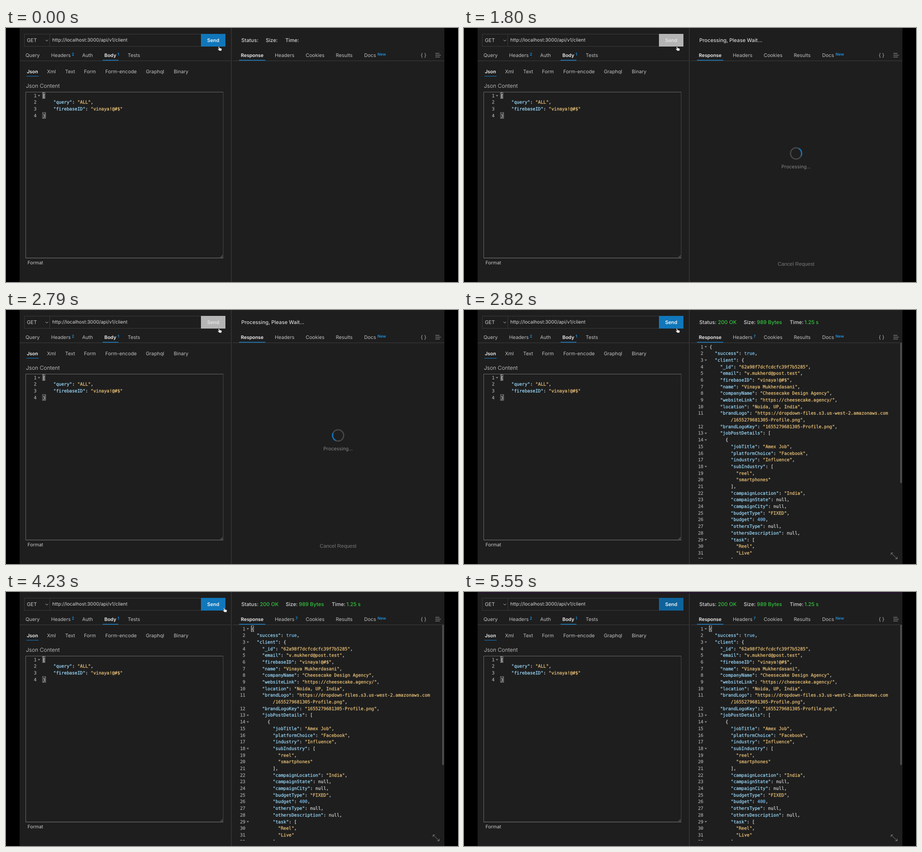
Animation, 997 px wide and 561 px high, one loop 6.03 s. Source, as an HTML page with a canvas:

```html
<!DOCTYPE html>
<html lang="en">
<head>
<meta charset="utf-8">
<title>API client request</title>
<style>
html, body { margin: 0; width: 100%; height: 100%; overflow: hidden; background: #000; }
canvas { display: block; width: 997px; height: 561px; }
</style>
</head>
<body>
<canvas id="stage" width="997" height="561"></canvas>
<script>
const ctx = document.getElementById('stage').getContext('2d');
const LOOP = 6030, SEND = 1560, DONE = 2820, FOCUS = 2880, MOVE = 4200;
const UI = 'Inter, sans-serif', MONO = '"DejaVu Sans Mono", monospace';
const CHAR = 5.88, LINE = 14.69;
const BUTTON = '#0e639c', HOVER = '#1177bb', LINK = '#1d93e4', GREEN = '#35c43f';
const TEXT = '#c0c0c0', BRIGHT = '#f2f2f2';

const requestBody = `{
    "query": "ALL",
    "firebaseID": "vinaya!@#$"
}`.split('\n');

const responseBody = `{
  "success": true,
  "client": {
    "_id": "62a98f7dcfcdcfc39f7b5285",
    "email": "v.mukherd@post.test",
    "firebaseID": "vinaya!@#$",
    "name": "Vinaya Mukherdasani",
    "companyName": "Cheesecake Design Agency",
    "websiteLink": "https://cheesecake.agency/",
    "location": "Noida, UP, India",
    "brandLogo": "https://dropdown-files.s3.us-west-2.amazonaws.com
        /1655279681305-Profile.png",
    "brandLogoKey": "1655279681305-Profile.png",
    "jobPostDetails": [
      {
        "jobTitle": "Amex Job",
        "platformChoice": "Facebook",
        "industry": "Influence",
        "subIndustry": [
          "reel",
          "smartphones"
        ],
        "campaignLocation": "India",
        "campaignState": null,
        "campaignCity": null,
        "budgetType": "FIXED",
        "budget": 400,
        "othersType": null,
        "othersDescription": null,
        "task": [
          "Reel",
          "Live"
        ],`.split('\n');

function rect(x, y, w, h, color) {
  ctx.fillStyle = color;
  ctx.fillRect(x, y, w, h);
}

function frame(x, y, w, h, color) {
  ctx.strokeStyle = color;
  ctx.lineWidth = 1;
  ctx.strokeRect(x, y, w, h);
}

function path(d, color, width = 1, fill) {
  const p = new Path2D(d);
  if (fill) { ctx.fillStyle = fill; ctx.fill(p); }
  ctx.strokeStyle = color;
  ctx.lineWidth = width;
  ctx.stroke(p);
}

function text(str, x, y, { size = 10.8, weight = 400, color = TEXT, font = UI, align = 'left' } = {}) {
  ctx.font = `${weight} ${size}px ${font}`;
  ctx.textAlign = align;
  ctx.fillStyle = color;
  ctx.fillText(str, x, y);
}

// Monospace text gets a hairline outline to look slightly heavier.
function mono(str, x, y, color, align = 'left') {
  text(str, x, y, { size: 9.77, font: MONO, color, align });
  ctx.strokeStyle = color;
  ctx.lineWidth = 0.25;
  ctx.strokeText(str, x, y);
}

function tabs(items, y, active) {
  for (const [label, x] of items) {
    const on = label === active;
    text(label, x, y, on ? { size: 10.5, weight: 600, color: BRIGHT } : {});
  }
}

const badge = (str, x, y) => text(str, x, y, { size: 8.6, weight: 600, color: LINK });

function tokenColor(token, isKey) {
  if (isKey) return '#9cdcfe';
  if (/["\/]/.test(token)) return '#efc57a';
  return /^(true|\d+)$/.test(token) ? '#74bdf2' : '#d8d8d8';
}

function code(lines, x, y, gutter) {
  let number = 0;
  lines.forEach((line, row) => {
    const base = y + row * LINE;
    const continued = line.trim()[0] === '/';
    if (!continued) mono(++number, gutter, base, '#a8a8a8', 'right');
    if (/[{[]$/.test(line)) {
      path(`M${gutter + 2.8} ${base - 4.4}h5l-2.5 3z`, '#8a8a8a', 0.2, '#8a8a8a');
    }
    for (const m of line.matchAll(/"[^"]*"(?=:)|"[^"]*"?|\/[^"]*"|true|\d+|[^"\s\d]+/g)) {
      const isKey = line[m.index + m[0].length] === ':';
      mono(m[0], x + m.index * CHAR, base, tokenColor(m[0], isKey));
    }
  });
}

function bracketBox(x, base, caretX, caretColor = '#c8c8c8') {
  frame(x, base - 10, 5.5, 13, '#858585');
  rect(caretX, base - 10.5, 1, 14, caretColor);
}

function requestPane(processing, hovered) {
  frame(40.5, 13.5, 443, 27, '#3a3a3a');
  rect(96, 14, 1, 26, '#3a3a3a');
  text('GET', 46, 31, { size: 11.1, color: '#cccccc' });
  path('M87 26l3 3l3 -3', '#bbb', 1);
  text('http://localhost:3000/api/v1/client', 102, 30, { size: 10.4, color: '#d8d8d8' });
  rect(430, 13, 54, 28, processing ? '#b5b5b5' : hovered ? HOVER : BUTTON);
  text('Send', 457, 30.5, { weight: 600, color: processing ? '#e2e2e2' : '#f4f4f4', align: 'center' });

  tabs([['Query', 43], ['Headers', 99.5], ['Auth', 168], ['Body', 217], ['Tests', 268.5]], 64, 'Body');
  badge('2', 145, 61);
  badge('1', 246, 61);
  rect(30, 72, 467, 1, '#3d3d3d');
  rect(213, 70.5, 35, 1.5, '#1480cc');

  tabs([['Json', 46], ['Xml', 90.5], ['Text', 130.5], ['Form', 172], ['Form-encode', 219],
        ['Graphql', 308.5], ['Binary', 370]], 100, 'Json');
  rect(45, 106, 27, 1, '#1480cc');
  text('Json Content', 44, 131.5, { size: 12, weight: 300, color: '#dddddd' });

  frame(43.5, 141.5, 435.5, 366.5, '#4a4a4a');
  path('M479 141.5H43.5V508H479', '#6c6c6c');
  path('M473 507l5 -5M476 507l2 -2', '#999', 0.8);
  code(requestBody, 81, 152.6, 67.5);
  bracketBox(80.5, 152.6, 82);
  bracketBox(80.5, 152.6 + 3 * LINE, 87, '#858585');
  text('Format', 47.5, 522.3, { size: 10.4, color: '#cccccc' });
}

function statusBar(processing, done) {
  const label = { size: 11.25, weight: 500, color: '#d6d6d6' };
  if (processing) return text('Processing, Please Wait...', 519, 31, label);
  const parts = done
    ? [['Status:', 519, '200 OK', 560], ['Size:', 617, '989 Bytes', 646], ['Time:', 718.5, '1.25 s', 751]]
    : [['Status:', 519], ['Size:', 573], ['Time:', 616]];
  for (const [name, x, value, vx] of parts) {
    text(name, x, 31, label);
    if (value) text(value, vx, 31, { ...label, size: 11.4, color: GREEN });
  }
}

function spinner(t) {
  const arc = (from, to, color) => {
    ctx.beginPath();
    ctx.arc(732.5, 277, 12.3, from, to);
    ctx.strokeStyle = color;
    ctx.lineWidth = 2.8;
    ctx.stroke();
  };
  const angle = Math.PI / 2 + (t - 2400) / 2000 * Math.PI * 2;
  arc(0, Math.PI * 2, '#464646');
  arc(angle - Math.PI / 4, angle + Math.PI / 4, '#1272b4');
  text('Processing...', 732.5, 310, { size: 10.6, color: '#868686', align: 'center' });
  text('Cancel Request', 732.5, 525, {
    size: 11.4, color: '#777777', font: '"Liberation Sans", sans-serif', align: 'center'
  });
}

function response(t) {
  ctx.save();
  ctx.beginPath();
  ctx.rect(500, 73, 467, 476);
  ctx.clip();
  code(responseBody, 541.5, 84.5, 528);
  if (t >= FOCUS) bracketBox(541, 84.5, 541);
  ctx.restore();
  rect(962, 73, 4, 309, '#4b4b4b');
  path('M942 536.5L955.5 549.5M942 541V536.5H946.5M955.5 545V549.5H951', '#929292', 0.9);
}

function responsePane(t, processing, done) {
  statusBar(processing, done);
  tabs([['Response', 518], ['Headers', 593], ['Cookies', 661], ['Results', 727.5], ['Docs', 790]], 64, 'Response');
  badge('New', 819.5, 61);
  if (done) badge('7', 638.5, 61);
  text('{ }', 921, 64, { size: 11, color: '#bcbcbc', align: 'center' });
  path('M947 56h9M947 60h12M947 64h10', '#a8a8a8');
  rect(500, 72, 467, 1, '#3d3d3d');
  rect(514, 70.5, 58, 1.5, '#1480cc');
  if (processing) spinner(t);
  if (done) response(t);
}

function pointerAt(t) {
  const k = Math.max(0, (t - MOVE) / 210);
  return { x: 468 + 77 * k, y: 40 - 39 * k };
}

function pointer({ x, y }, hovered) {
  if (y < -14) return;
  ctx.save();
  ctx.translate(x, y);
  if (hovered) {
    path('M0 .8Q1.2 -.5 2 1L3.2 4L7 5Q8.4 5.6 8 7.6L7.2 10.5H2.8L-1 7Q-1.6 5.6 .2 5.8L1.4 6.4Z', '#222', 0.7, '#f2f2f2');
  } else {
    path('M0 0V9.8L2.3 7.8L3.8 11.2L5.4 10.5L3.9 7.2H6.9Z', '#e8e8e8', 0.9, '#111');
  }
  ctx.restore();
}

function draw() {
  const t = performance.now() % LOOP;
  const processing = t >= SEND && t < DONE, done = t >= DONE;
  const mouse = pointerAt(t), hovered = mouse.x < 484;
  ctx.textRendering = 'geometricPrecision';
  rect(0, 0, 997, 561, '#000');
  rect(30, 0, 937, 561, '#1e1e1e');
  rect(496.5, 0, 1, 561, '#444');
  requestPane(processing, hovered);
  responsePane(t, processing, done);
  // Edge of the system menu bar peeking in once the pointer reaches the top.
  ctx.globalAlpha = Math.min(1, Math.max(0, (t - 4450) / 300));
  rect(30, 0, 937, 3, '#24142a');
  ctx.globalAlpha = 1;
  pointer(mouse, hovered);
  requestAnimationFrame(draw);
}
draw();
</script>
</body>
</html>
```
